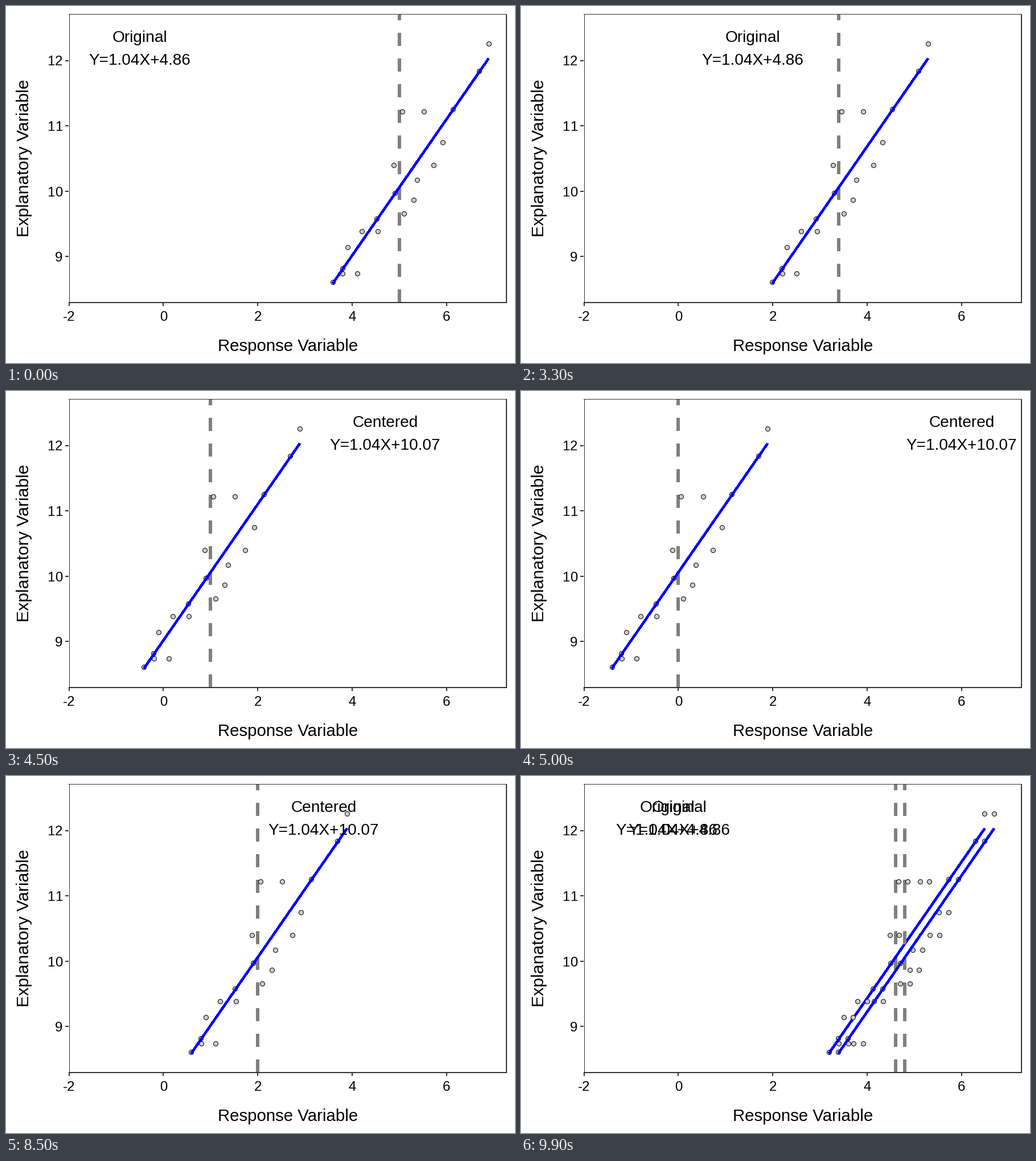
Write a matplotlib script that moves like this. It is 894 by 626 pixels and loops after 10000 ms.

```python
import matplotlib.pyplot as plt
from matplotlib.animation import FuncAnimation

W, H, DPI = 894, 626, 100
PX = 72 / DPI                      # points per pixel
LEFT, RIGHT, TOP, BOTTOM = 110, 880, 14, 520
INK = "#333333"
MEAN, STEPS, HOLD, FRAMES = 5.0, 25, 26, 100

# residual -> centred predictor values that sit that far off the fitted line
BANDS = {
    0.02: (-1.41, -1.21, -0.48, -0.10, 1.13, 1.69),
    0.23: (-1.10, 1.89),
    -0.27: (0.37, 0.92),
    -0.51: (0.10, 0.30),
}
# height -> the two predictor values that share it
LEVELS = {8.74: (-1.20, -0.89), 9.39: (-0.80, -0.46),
          10.40: (-0.12, 0.73), 11.22: (0.06, 0.52)}

plt.rcParams["font.family"] = "Liberation Sans"
fig = plt.figure(figsize=(W / DPI, H / DPI), dpi=DPI, facecolor="white")
ax = fig.add_axes([0, 0, 1, 1])
ax.set_xlim(0, W)
ax.set_ylim(H, 0)
ax.axis("off")


def to_x(v):
    return 276.4 + 82.9 * v


def to_y(v):
    return 439.3 - 114.55 * (v - 9)


def fitted(x):
    return 10.06 + 1.043 * x


def make_points():
    points = [(x, fitted(x) + r) for r, xs in BANDS.items() for x in xs]
    points += [(x, y) for y, xs in LEVELS.items() for x in xs]
    return sorted(points)


POINTS = make_points()
FIT = [(x, fitted(x)) for x, _ in (POINTS[0], POINTS[-1])]


def write(x, y, text, size, **kw):
    style = dict(ha="center", va="baseline", color="black",
                 rotation_mode="anchor")
    style.update(kw)
    return ax.text(x, y, text, fontsize=size * PX, **style)


def bar(x, y, w, h):
    ax.add_patch(plt.Rectangle((x, y), w, h, fc=INK, lw=0, zorder=20,
                               antialiased=False))


def draw_axes():
    bar(LEFT, TOP, RIGHT - LEFT, 1)
    bar(LEFT + 1, TOP, 1, BOTTOM - TOP)
    bar(RIGHT - 2, TOP, 2, BOTTOM - TOP)
    bar(LEFT, BOTTOM - 1, RIGHT - LEFT, 2)
    for v in range(-2, 7, 2):
        x = to_x(v)
        bar(round(x) - 1, BOTTOM, 2, 6)
        write(x, 552.5, str(v), 24)
    for v in range(9, 13):
        y = to_y(v)
        bar(LEFT - 6, round(y) - 1, 6, 2)
        # evenly spaced digits, so that "11" is not kerned
        for i, digit in enumerate(reversed(str(v)), 1):
            write(99 - 13.35 * i, y + 8.8, digit, 24, ha="left")
    write(495, 605, "Response Variable", 29.4)
    write(40, 266.5, "Explanatory Variable", 30.2, rotation=90)


class Scatter:
    """Points, mean line, fitted line and label that move together."""

    def __init__(self, z):
        self.mean, = ax.plot([], [], color="#7F7F7F", lw=5.6 * PX,
                             dashes=(4, 4), dash_capstyle="butt",
                             antialiased=False, zorder=z)
        self.dots, = ax.plot([], [], "o", ms=8 * PX, mfc="#CCCCCC",
                             mec="black", mew=PX, antialiased=False,
                             zorder=z + 1)
        self.fit, = ax.plot([], [], color="#0000FF", lw=3.4 * PX,
                            solid_capstyle="butt", antialiased=False,
                            zorder=z + 2)
        self.title = write(0, 63, "", 28, zorder=z + 3)
        self.formula = write(0, 102.8, "", 28, zorder=z + 3)
        self.artists = [self.mean, self.dots, self.fit,
                        self.title, self.formula]

    def place(self, step):
        t = step / STEPS
        shift = MEAN * (1 - t)
        for artist, data in ((self.dots, POINTS), (self.fit, FIT)):
            artist.set_data([to_x(x + shift) for x, _ in data],
                            [to_y(y) for _, y in data])
        x = to_x(shift)
        self.mean.set_data([x, x], [BOTTOM - 0.2, TOP + 1])
        centered = t >= 0.5
        self.title.set_text("Centered" if centered else "Original")
        self.formula.set_text("Y=1.04X+10.07" if centered
                              else "Y=1.04X+4.86")
        label_x = to_x(-0.5 + 6.5 * t)
        self.title.set_x(label_x)
        self.formula.set_x(label_x - 0.5)

    def show(self, on):
        for artist in self.artists:
            artist.set_visible(on)


def step_at(n):
    if n < FRAMES // 2:
        return max(0, n - HOLD + 1)
    return STEPS - max(0, n - FRAMES // 2 - HOLD + 1)


draw_axes()
trail, main = Scatter(2), Scatter(8)


def update(n):
    main.place(step_at(n))
    # the previous pose stays visible just before the loop restarts
    last = n == FRAMES - 1
    trail.place(step_at(n - 1) if last else step_at(n))
    trail.show(last)
    return main.artists + trail.artists


anim = FuncAnimation(fig, update, frames=FRAMES, interval=100,
                     init_func=lambda: update(0), repeat=True,
                     repeat_delay=0, blit=False)
plt.show()
```
